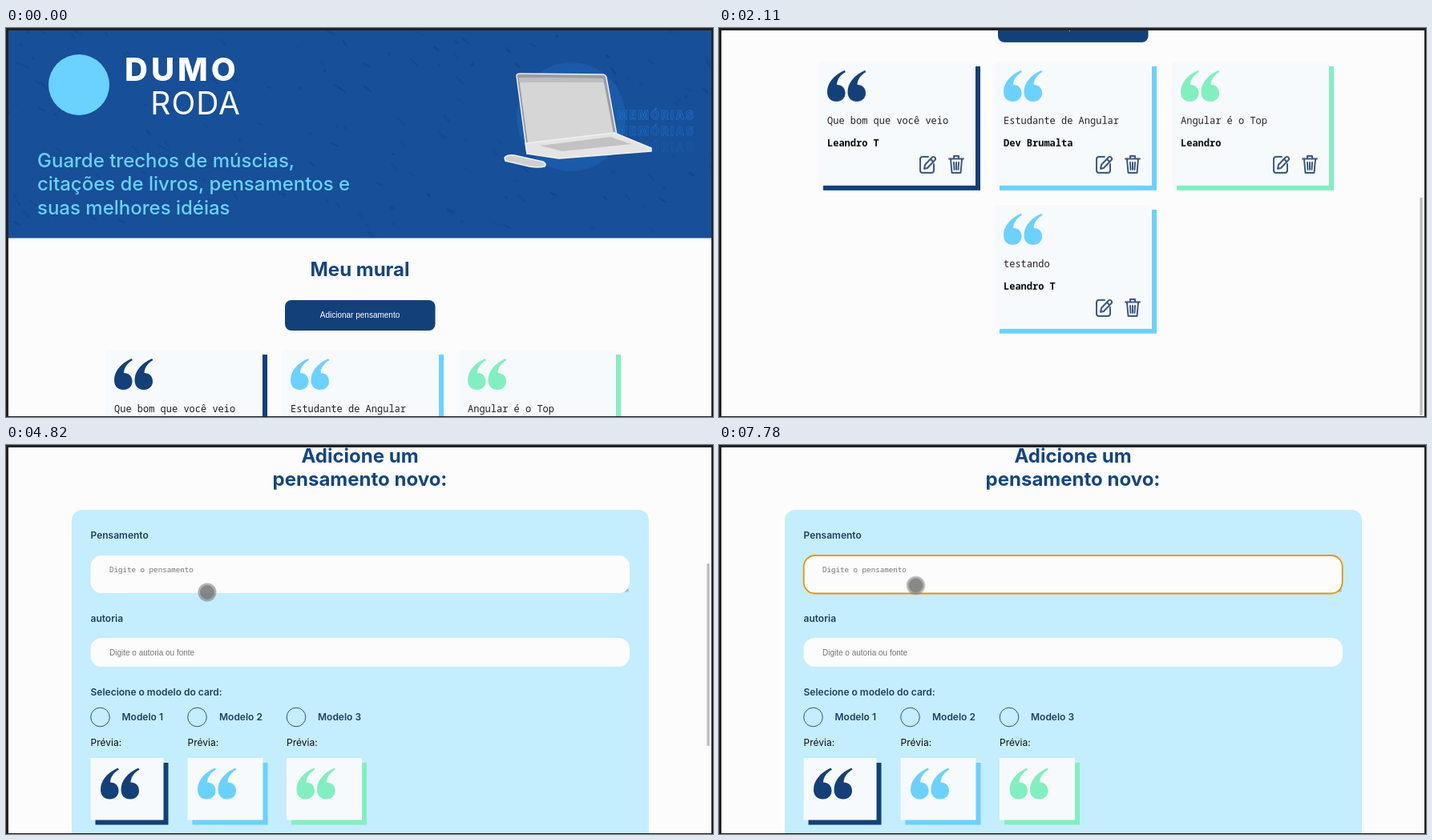
Recreate the animation shown at these times as an HTML page. Size 882 by 486 pixels, loop 8 s.

```html
<!DOCTYPE html>
<html lang="pt-BR">
<head>
<meta charset="utf-8">
<title>Mural de pensamentos</title>
<style>
  html, body { margin: 0; width: 100%; height: 100%; overflow: hidden; background: #fcfcfd; }
  svg { display: block; width: 882px; height: 486px; }
  text { white-space: pre; }
  .brand { font: 800 40px Inter, sans-serif; letter-spacing: 4px; fill: #fff; }
  .brand2 { font: 400 39px Inter, sans-serif; letter-spacing: 1px; fill: #fff; }
  .lead { font: 500 24px Inter, sans-serif; fill: #6bd1ff; }
  .title { font: 700 24px Inter, sans-serif; fill: #154580; text-anchor: middle; }
  .label { font: 600 12px Inter, sans-serif; fill: #22405f; }
  .small { font: 400 12px Inter, sans-serif; fill: #111; }
  .mono { font: 400 12px "Noto Sans Mono", monospace; fill: #222; }
  .author { font: 700 12px "Noto Sans Mono", monospace; fill: #0a0a0a; }
  .hintMono { font: 400 9.2px "Noto Sans Mono", monospace; fill: #757575; }
  .hint { font: 400 10px "Liberation Sans", Arial, sans-serif; fill: #757575; }
  .button { font: 400 10px "Liberation Sans", Arial, sans-serif; fill: #fff; text-anchor: middle; }
  .memory { font: 800 14px Inter, sans-serif; letter-spacing: 2.4px; fill: none; stroke: #1f6cc4; stroke-width: .9; }
  .icon { fill: none; stroke: #38527c; stroke-width: 1.9; stroke-linecap: round; stroke-linejoin: round; }
</style>
</head>
<body>
<svg id="stage" viewBox="0 0 882 486" xmlns="http://www.w3.org/2000/svg"></svg>
<script>
const LOOP = 8000;
const NAVY = '#134079', SKY = '#6bd1ff', GREEN = '#82efc0', PAPER = '#f7fafd', PAGE = '#fcfcfd';
const stage = document.getElementById('stage');

function add(parent, tag, attrs = {}, text) {
  const el = document.createElementNS('http://www.w3.org/2000/svg', tag);
  for (const [name, value] of Object.entries(attrs)) el.setAttribute(name, value);
  if (text) el.textContent = text;
  return parent.appendChild(el);
}
const group = (parent, x = 0, y = 0) => add(parent, 'g', { transform: `translate(${x} ${y})` });
const rect = (parent, x, y, width, height, fill, rx = 0) =>
  add(parent, 'rect', { x, y, width, height, fill, rx });
const circle = (parent, cx, cy, r, fill, more) => add(parent, 'circle', { cx, cy, r, fill, ...more });
const path = (parent, d, attrs) => add(parent, 'path', { d, ...attrs });
const label = (parent, x, y, text, kind, more) => add(parent, 'text', { x, y, class: kind, ...more }, text);

function seeded(seed) {
  return () => (seed = (seed * 16807) % 2147483647) / 2147483647;
}

function quotes(parent, x, y, fill) {
  for (const dx of [0, 25.5])
    path(group(parent, x + dx, y),
      'M23 2L21.5 0C8 6 0 16 0 27C0 35 5 39 11.5 39C18 39 22.5 34.5 22.5 28.5C22.5 22 18 18 12 18C12.5 11 16 6 23 2Z',
      { fill });
}

function paper(parent, w, h, color) {
  rect(parent, 6, 6, w, h, color);
  rect(parent, 0, 0, w, h, PAPER);
}

function card(parent, x, y, color, text, author) {
  const g = group(parent, x, y);
  paper(g, 196, 155, color);
  quotes(g, 11, 11, color);
  label(g, 11, 78, text, 'mono');
  label(g, 11, 106, author, 'author');
  path(group(g, 126, 117),
    'M11 2H4Q1 2 1 5V19Q1 22 4 22H15Q18 22 18 19V11M6 17L7 12L16 2.5Q18 1 19.5 3T19 6.5L10 16ZM14 5L17 8',
    { class: 'icon' });
  path(group(g, 162, 117),
    'M1 4.5H19M7 4V1H13V4M3 5L4.5 22H15.5L17 5M7 9L7.5 18M10 9V18M13 9L12.5 18',
    { class: 'icon' });
}

function drawTexture(parent) {
  const random = seeded(41);
  for (let i = 0; i < 170; i++) {
    const x = random() * 882, y = random() * 258;
    add(parent, 'ellipse', {
      rx: 1.5 + random() * 6, ry: .7 + random() * 1.4, fill: '#0e3a78', opacity: .1 + random() * .3,
      transform: `translate(${x} ${y}) rotate(${20 + random() * 40})`,
    });
  }
}

function drawLaptop(parent) {
  const edge = { stroke: '#f0f0f0', 'stroke-width': 1.5, 'stroke-linejoin': 'round' };
  path(parent, 'M637 60Q637 57 641 57L744 58Q748 58 749 62L762 134L650 157Z', { fill: '#9a9da4', ...edge });
  path(parent, 'M640 62L745 63L758 132L652 152Z', { fill: '#d6d6d6' });
  path(parent, 'M640 62L745 63L746 68L641 68Z', { fill: '#bdbdbf' });
  path(parent, 'M648 144L759 131L805 150V154L690 163L650 157Z', { fill: '#e4e4e4', ...edge });
  path(parent, 'M666 147L754 136L780 145L694 154Z', { fill: '#c2c2c4' });
  path(parent, 'M622 162Q625 158 634 159L670 167Q675 170 672 173Q664 175 653 173L623 166Z',
    { fill: '#cfcfcf', ...edge });
}

function drawBanner(parent) {
  rect(parent, 0, 0, 882, 262.5, '#174f98');
  drawTexture(parent);
  circle(parent, 91, 71, 38, SKY);
  label(parent, 148, 66, 'DUMO', 'brand');
  label(parent, 293, 108, 'RODA', 'brand2', { 'text-anchor': 'end' });
  ['Guarde trechos de múscias,', 'citações de livros, pensamentos e', 'suas melhores idéias']
    .forEach((line, i) => label(parent, 39, 174 + i * 29.4, line, 'lead'));

  circle(parent, 705, 111, 68, '#1a5aa8');
  [1, .75, .35].forEach((opacity, i) =>
    label(parent, 762, 114 + i * 20, 'MEMÓRIAS', 'memory', { opacity }));
  drawLaptop(parent);
}

function drawWall(parent) {
  label(parent, 441.5, 310, 'Meu mural', 'title');
  rect(parent, 348, 340, 187.5, 38, NAVY, 8);
  label(parent, 441.5, 362, 'Adicionar pensamento', 'button');
  card(parent, 124, 402, NAVY, 'Que bom que você veio', 'Leandro T');
  card(parent, 344, 402, SKY, 'Estudante de Angular', 'Dev Brumalta');
  card(parent, 565, 402, GREEN, 'Angular é o Top', 'Leandro');
  card(parent, 344, 581, SKY, 'testando', 'Leandro T');
}

function drawForm(parent) {
  label(parent, 441.5, 321, 'Adicione um', 'title');
  label(parent, 441.5, 350, 'pensamento novo:', 'title');
  rect(parent, 82, 380, 720, 520, '#c4edfd', 13);
  label(parent, 105.5, 416, 'Pensamento', 'label');
  rect(parent, 105.5, 437, 672.5, 47, PAGE, 14);
  path(parent, 'M773 482.5L776.5 479M775.5 482.5L776.5 481.5', { stroke: '#555', 'stroke-width': .8 });
  label(parent, 129, 458, 'Digite o pensamento', 'hintMono');
  label(parent, 105.5, 520, 'autoria', 'label');
  rect(parent, 105.5, 540, 672.5, 36, PAGE, 14);
  label(parent, 129, 562, 'Digite o autoria ou fonte', 'hint');
  label(parent, 105.5, 612, 'Selecione o modelo do card:', 'label');
  [[105.5, 91, 39, NAVY], [226.5, 94, 39.5, SKY], [350, 94, 39, GREEN]].forEach(([x, w, gap, color], i) => {
    circle(parent, x + 12, 639, 11.8, 'none', { stroke: '#2a5488' });
    label(parent, x + gap, 643, `Modelo ${i + 1}`, 'label');
    label(parent, x, 675, 'Prévia:', 'small');
    const g = group(parent, x, 690);
    paper(g, w, 77.5, color);
    quotes(g, 12.5, 12.5, color);
  });
}

// rows: [time, value, easing towards the next row]
function play(el, property, rows, format = v => v) {
  const frames = rows.map(([time, value, easing = 'linear']) =>
    ({ offset: time / LOOP, [property]: format(value), easing }));
  if (rows[0][0] > 0) frames.unshift({ ...frames[0], offset: 0, easing: 'linear' });
  if (rows.at(-1)[0] < LOOP) frames.push({ ...frames.at(-1), offset: 1 });
  el.animate(frames, { duration: LOOP, iterations: Infinity });
}
const toggle = (el, rows) =>
  play(el, 'opacity', [[0, 0], ...rows].map(([time, on]) => [time, on, 'step-end']));
const shiftY = y => `translate(0px, ${y}px)`;

const SCROLL = [
  [1330, 0, 'cubic-bezier(.4,0,.8,.8)'], [1590, 132], [2110, 360, 'ease-out'], [2240, 374],
  [2540, 374, 'ease-in'], [2720, 326], [2920, 242, 'ease-out'], [3060, 224],
  [4470, 224, 'ease-in-out'], [4820, 299],
  [5080, 299, 'ease-in-out'], [5420, 374],
  [5630, 374, 'ease-in-out'], [5980, 299],
];
const PAGE_SWAP = 3400;

rect(stage, 0, 0, 882, 486, PAGE);
const sheet = add(stage, 'g');
const wall = add(sheet, 'g');
const form = add(sheet, 'g');
drawBanner(sheet);
drawWall(wall);
drawForm(form);
play(sheet, 'transform', SCROLL, y => shiftY(-y));
play(wall, 'opacity', [[0, 1, 'step-end'], [PAGE_SWAP, 0, 'step-end']]);
toggle(form, [[PAGE_SWAP, 1]]);

const focusRing = add(form, 'rect', {
  x: 105.7, y: 437, width: 672, height: 47.5, rx: 14, fill: 'none', stroke: '#e59700', 'stroke-width': 1.8,
});
toggle(focusRing, [[6370, 1]]);
const caret = rect(form, 129, 448, 1, 13, '#111');
toggle(caret, [[6370, 1], [6840, 0], [7310, 1], [7780, 0]]);

function scrollThumb(height, ratio, from, to) {
  const thumb = rect(stage, 874.5, 3, 3, height, '#b8b8b8', 1);
  play(thumb, 'transform', SCROLL, y => shiftY(y * ratio));
  toggle(thumb, [[from, 1], [to, 0]]);
}
scrollThumb(272, .58, 1330, 3230);
scrollThumb(228, .485, 4470, 6410);

const pointer = add(stage, 'g');
circle(pointer, 0, 0, 11.5, '#777', { opacity: .55 });
circle(pointer, 0, 0, 9, '#6a6a6a', { opacity: .6 });
play(pointer, 'transform', [
  [430, [807, 11]], [650, [573, 116]],
  [860, [487, 188]], [900, [474, 199], 'step-end'],
  [3350, [420.5, 139]], [4130, [420.5, 139], 'step-end'], [4220, [412, 149]],
  [4470, [412, 149], 'ease-in-out'], [4820, [251, 184]],
  [5630, [251, 184], 'ease-in-out'], [6190, [248.5, 175.5]],
  [6450, [248.5, 175.5], 'ease-in-out'], [6620, [277, 195], 'ease-in-out'], [6840, [245.5, 175.5]],
], ([x, y]) => `translate(${x}px, ${y}px)`);
toggle(pointer, [[430, .4], [650, 0], [860, .4], [900, 0], [PAGE_SWAP, 1]]);

// window edge
path(stage, 'M0 0H882V486H0ZM3 3V485H880V3Z', { fill: '#212121', 'fill-rule': 'evenodd' });
</script>
</body>
</html>
```
